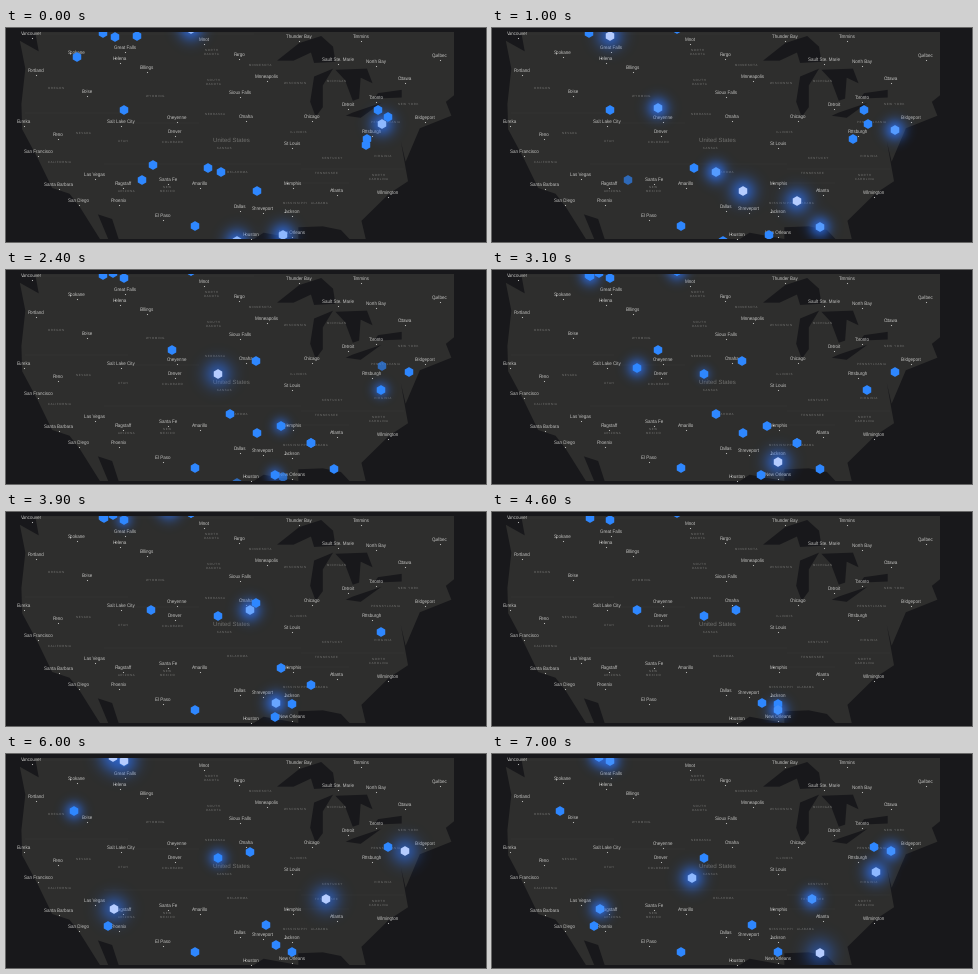
A matplotlib script that plays this animation: 480 px wide and 214 px high, repeating every 7700 ms.

```python
import numpy as np
import matplotlib.pyplot as plt
from matplotlib.animation import FuncAnimation
from matplotlib.collections import PolyCollection
from matplotlib.patches import Polygon, Rectangle

W, H, DPI = 480, 214, 100
STEP, FRAMES = 100, 77
LIFE, FADE, GLOW = 2900, 300, 1000  # ms

SEA, LAND, BORDER = "#18181b", "#2e2e2d", "#393938"
PALE = np.array([0.71, 0.8, 1])
BLUE = np.array([0.18, 0.53, 1])
GLOW_BLUE = (0.18, 0.45, 0.96)

plt.rcParams["text.hinting"] = "none"
plt.rcParams["font.family"] = "Liberation Sans"


def project(points):
    """Mercator: longitude/latitude in degrees to stage pixels."""
    lon, lat = np.array(points, float).T
    merc = np.log(np.tan(np.pi / 4 + np.radians(lat) / 2))
    return np.column_stack([997.7 + 7.89 * lon, 128 - 452 * (merc - 0.713)])


COAST = [(-123, 50), (-122.3, 47.5), (-124.7, 48.4), (-124, 46), (-124.5, 42.8),
         (-124.4, 40.4), (-122.4, 37.5), (-120.6, 34.5), (-118.4, 33.9), (-117.1, 32.5),
         (-114.4, 28.8), (-113.4, 28.8), (-114.8, 31.7), (-113, 31.2), (-112.1, 28.8),
         (-95.4, 28.8), (-93.8, 29.7), (-89.4, 29), (-89.4, 30.3), (-86.3, 30.4),
         (-84, 30), (-82.7, 28.8), (-80.8, 28.8), (-81.4, 31), (-77.9, 33.9),
         (-75.5, 35.2), (-76.4, 39.2), (-75.8, 37.2), (-74, 40.5), (-70, 41.7),
         (-70.7, 43), (-69, 44), (-69, 50)]
SUPERIOR = [(-92.1, 46.7), (-90, 46.7), (-87.8, 47.4), (-87.4, 46.5), (-84.7, 46.6),
            (-85, 47.9), (-86.5, 48.8), (-89.3, 48.2)]
MICHIGAN = [(-87.2, 41.6), (-87.9, 43), (-87.4, 45.3), (-85, 46), (-86.3, 44.5),
            (-86.3, 42.5)]
HURON = [(-84.7, 45.9), (-80.7, 46), (-80, 44.7), (-81.5, 45.2), (-81.7, 43.3),
         (-82.5, 43.1), (-83.5, 45)]
ERIE = [(-83.4, 41.7), (-82.5, 42), (-78.9, 42.9), (-81.5, 41.5)]
ONTARIO = [(-79.8, 43.3), (-79.3, 43.8), (-76.3, 44.1), (-76.3, 43.4)]

# latitude: west and east end of a straight state line
PARALLELS = {49: (-123, -95), 42: (-124, -111), 41: (-111, -102), 37: (-114, -89),
             36.5: (-89, -76), 35: (-90, -83)}

CITIES = [
    ("Vancouver", 26, 6), ("Spokane", 71, 25), ("Great Falls", 119, 20), ("Helena", 114, 31),
    ("Billings", 141, 40), ("Minot", 198, 12), ("Fargo", 233, 27), ("Thunder Bay", 293, 9),
    ("Timmins", 355, 9), ("Québec", 434, 28), ("North Bay", 370, 34),
    ("Sault Ste. Marie", 332, 32), ("Ottawa", 399, 51), ("Minneapolis", 261, 49),
    ("Sioux Falls", 234, 65), ("Portland", 30, 43), ("Boise", 81, 64), ("Omaha", 240, 89),
    ("Cheyenne", 171, 90), ("Denver", 169, 104), ("Salt Lake City", 115, 94),
    ("Reno", 52, 107), ("Eureka", 18, 94), ("Detroit", 342, 77), ("Chicago", 306, 89),
    ("Toronto", 370, 70), ("Bridgeport", 419, 90), ("Pittsburgh", 366, 104),
    ("St Louis", 286, 116), ("San Francisco", 32, 124), ("Las Vegas", 89, 147),
    ("Flagstaff", 117, 156), ("Santa Fe", 162, 152), ("Amarillo", 194, 156),
    ("Memphis", 287, 156), ("Atlanta", 331, 163), ("Wilmington", 382, 165),
    ("Santa Barbara", 53, 157), ("San Diego", 73, 173), ("Phoenix", 113, 173),
    ("El Paso", 157, 188), ("Dallas", 234, 179), ("Shreveport", 257, 181),
    ("Jackson", 286, 184), ("New Orleans", 286, 205), ("Houston", 245, 207),
]
STATES = [
    ("NORTH\nDAKOTA", 205, 24), ("SOUTH\nDAKOTA", 207, 54), ("MINNESOTA", 254, 37),
    ("WISCONSIN", 289, 55), ("MICHIGAN", 330, 53), ("WYOMING", 149, 68), ("OREGON", 50, 60),
    ("NEBRASKA", 209, 86), ("ILLINOIS", 292, 104), ("UTAH", 117, 113),
    ("COLORADO", 166, 114), ("KANSAS", 218, 120), ("NEVADA", 77, 105),
    ("CALIFORNIA", 53, 134), ("ARIZONA", 120, 163), ("NEW\nMEXICO", 161, 161),
    ("OKLAHOMA", 231, 144), ("KENTUCKY", 326, 130), ("TENNESSEE", 320, 145),
    ("VIRGINIA", 377, 128), ("NORTH\nCAROLINA", 372, 149), ("ALABAMA", 313, 175),
    ("MISSISSIPPI", 289, 175), ("NEW YORK", 402, 76), ("PENNSYLVANIA", 379, 94),
]

# birth time in ms: places that light up then
EARLY = {
    -2050: [(71, 29), (109, 9), (131, 8), (382, 89), (360, 117), (147, 137), (215, 144),
            (251, 163)],
    -1700: [(136, 152)],
    -1200: [(97, 5), (118, 82), (372, 82), (361, 111), (202, 140), (189, 198)],
    -300: [(185, 1), (376, 96), (277, 207), (231, 213)],
}
MIDDLE = {
    550: [(166, 80), (403, 102), (224, 144), (328, 199)],
    800: [(251, 163), (118, 8), (305, 173)],
    1400: [(305, 173), (107, 3), (189, 198), (97, 5), (185, 1), (250, 91)],
    1700: [(375, 120), (275, 156), (269, 205)],
    2300: [(212, 104)],
    2550: [(145, 98), (98, 6), (185, 1)],
    2900: [(286, 192)],
}
LATE = {
    3200: [(118, 8)],
    3500: [(244, 98), (270, 191), (163, -3)],
    4100: [(286, 198)],
    4650: [(189, 198), (260, 171)],
    5000: [(102, 172), (382, 93)],
    5400: [(212, 104), (68, 57)],
    5900: [(118, 7), (108, 155), (320, 145), (399, 97), (107, 3)],
    6100: [(200, 124), (384, 118)],
    6400: [(328, 199)],
}
PULSES = [(x, y, birth) for act in (EARLY, MIDDLE, LATE)
          for birth, places in act.items() for x, y in places]

fig = plt.figure(figsize=(W / DPI, H / DPI), dpi=DPI, facecolor=SEA)
ax = fig.add_axes([0, 0, 1, 1])
ax.axis("off")
view = Rectangle((0, 4), 447.5, 207, transform=ax.transData)


def add_clipped(artist):
    ax.add_artist(artist)
    artist.set_clip_path(view)


def label(text, x, y, px, color):
    ax.text(x, y, text, size=px * 72 / DPI, color=color, ha="center", va="center",
            linespacing=1.5, zorder=3).set_clip_path(view)


add_clipped(Polygon(project(COAST), fc=LAND, ec="none"))
for lake in (SUPERIOR, MICHIGAN, HURON, ERIE, ONTARIO):
    add_clipped(Polygon(project(lake), fc=SEA, ec="none", zorder=2))
for lat, ends in PARALLELS.items():
    line = project([(lon, lat) for lon in ends])
    ax.plot(*line.T, color=BORDER, lw=0.35, zorder=1.5)[0].set_clip_path(view)

for name, x, y in STATES:
    label("\n".join(" ".join(word) for word in name.split("\n")), x, y, 2.7, "#7b7b79")
for name, x, y in CITIES:
    label(name, x, y, 4.5, "#c4c4c2")
dots = np.array([(x, y + 4) for _, x, y in CITIES])
ax.scatter(*dots.T, s=0.7, c="#c4c4c2", lw=0, zorder=3).set_clip_path(view)
label("United States", 225, 112, 6.2, "#70706e")

rows, cols = np.mgrid[0:H, 0:W] + 0.5
halo = np.zeros((H, W, 4))
halo[..., :3] = GLOW_BLUE
halo_image = ax.imshow(halo, extent=(0, W, H, 0), aspect="auto",
                       interpolation="nearest", zorder=4)
halo_image.set_clip_path(view)
hexes = PolyCollection([], lw=0, zorder=5)
add_clipped(hexes)
ax.set(xlim=(0, W), ylim=(H, 0))

corners = np.radians(30 + 60 * np.arange(6))
HEXAGON = 4.9 * np.column_stack([np.cos(corners), np.sin(corners)])


def clock(i):
    """Both closing pictures are held for 700 ms."""
    return min(i, 63) * STEP if i < 70 else 6400


def update(i):
    now = clock(i)
    clear = np.ones((H, W))
    shapes, colors = [], []
    for x, y, birth in PULSES:
        age = now - birth
        if not 0 <= age < LIFE:
            continue
        u = min(age / GLOW, 1)
        if u < 1:
            sigma = 10.5 - 6.5 * u
            power = 0.45 * (1 - u) + 0.5 * np.sin(np.pi * u)
            dist2 = (cols - x) ** 2 + (rows - y) ** 2
            clear *= 1 - power * np.exp(-dist2 / (2 * sigma ** 2))
        mix = np.clip((u - 0.2) / 0.35, 0, 1)
        shapes.append(HEXAGON + (x, y))
        colors.append((*(PALE + (BLUE - PALE) * mix), min((LIFE - age) / FADE, 1)))
    halo[..., 3] = 1 - clear
    halo_image.set_data(halo)
    hexes.set_verts(shapes)
    hexes.set_facecolor(colors)
    return halo_image, hexes


anim = FuncAnimation(fig, update, frames=FRAMES, interval=STEP, repeat=True,
                     repeat_delay=0, blit=False)
plt.show()
```
